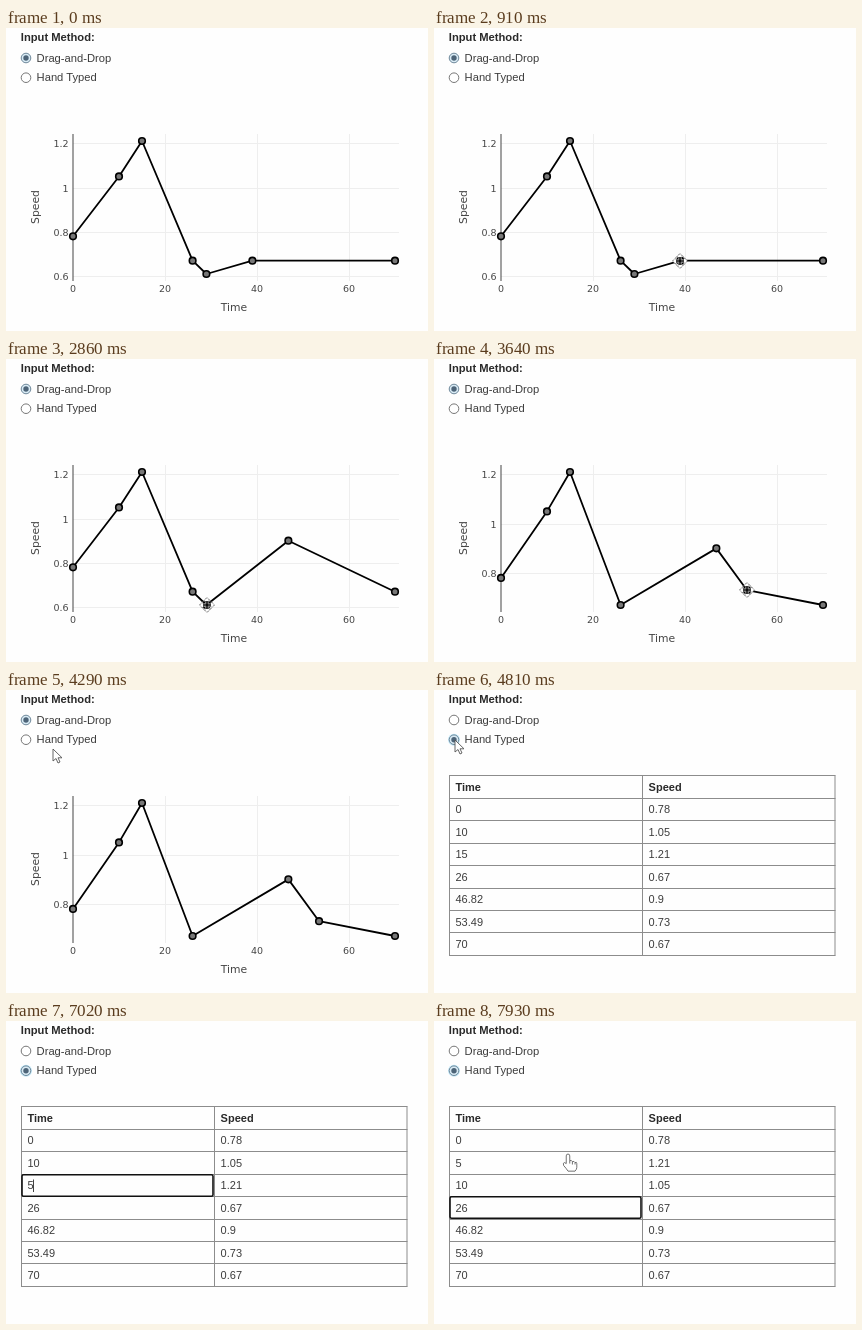
Write an HTML page that moves like this. It is 422 px wide and 303 px high and loops after 8 s.

```html
<!DOCTYPE html>
<html lang="en">
<head>
<meta charset="utf-8">
<title>Input method</title>
<style>
  html, body { margin: 0; width: 100%; height: 100%; overflow: hidden; background: #fefefe; }
  svg { display: block; width: 422px; height: 303px; font: 11.2px "Liberation Sans", Arial, sans-serif; fill: #3c3c3c; }
  .bold { font-weight: bold; fill: #2a2a2a; }
  .cell { font-size: 11px; }
  .tick { font: 9.5px "DejaVu Sans", Verdana, sans-serif; fill: #444; }
  .axis { font: 10.8px "DejaVu Sans", Verdana, sans-serif; fill: #444; text-anchor: middle; }
  .grid { stroke: #eee; }
  .zero { stroke: #444; }
  .trace { fill: none; stroke: #000; stroke-width: 1.8; stroke-linejoin: round; }
  .marker { fill: #777; stroke: #000; stroke-width: 1.6; }
  .border { fill: none; stroke: #8c8c8c; stroke-width: 1; }
  .active { fill: #fefefe; stroke: #111; stroke-width: 1.6; }
  .pointer { fill: #fff; stroke: #555; stroke-width: .9; stroke-linejoin: round; }
</style>
</head>
<body>
<svg id="stage" viewBox="0 0 422 303"></svg>
<script>
const LOOP = 8000, STEP = 130;
const TABLE_OPENS = 4680, RELEASE_A = 1950, RELEASE_B = 3640;
const CELL_CLICK = 6110, TYPED = 7020, ENTERED = 7410, SORTED = 7540;

// Pointer stops: time, x, y, shape used from that time on
const stops = [
  [0, 334, 262, ''],
  [390, 330, 260, 'arrow'],
  [780, 290, 247, 'arrow'],
  [910, 246, 233, 'move'],
  [1170, 247, 232, 'move'],
  [1690, 282, 181, 'move'],
  [1950, 282, 181, 'move'],
  [2080, 258, 200, 'arrow'],
  [2340, 202, 244, 'move'],
  [2730, 202, 244, 'move'],
  [2860, 201, 246, 'move'],
  [3120, 206, 245, 'move'],
  [3510, 313, 231, 'move'],
  [3640, 313, 231, 'move'],
  [3770, 262, 196, 'arrow'],
  [4160, 62, 76, 'arrow'],
  [4290, 47, 59, 'arrow'],
  [4550, 21, 49, 'arrow'],
  [4810, 21, 50, 'arrow'],
  [5070, 46, 94, 'hand'],
  [5590, 76, 178, 'hand'],
  [5720, 74, 177, 'hand'],
  [5980, 58, 164, 'hand'],
  [6240, 58, 164, 'hand'],
  [7020, 58, 164, ''],
  [7930, 134, 134, 'hand']
];

const start = [[0, .78], [10, 1.05], [15, 1.21], [26, .67], [29, .61], [39, .67], [70, .67]];
const raised = start.map((p, i) => i === 5 ? [46.82, .9] : p);
const moved = [...raised.filter((p, i) => i !== 4 && i !== 6), [53.49, .73], [70, .67]];

const line = (x1, y1, x2, y2, cls) =>
  `<line x1="${x1}" y1="${y1}" x2="${x2}" y2="${y2}" class="${cls}"/>`;
const text = (x, y, str, cls = '', extra = '') =>
  `<text x="${x}" y="${y}" class="${cls}" ${extra}>${str}</text>`;

function pointerAt(t) {
  const i = stops.findLastIndex(s => s[0] <= t);
  const [t0, x0, y0, kind] = stops[i];
  const [t1, x1, y1] = stops[i + 1] || [LOOP, x0, y0];
  const k = (t - t0) / (t1 - t0);
  return { x: x0 + (x1 - x0) * k, y: y0 + (y1 - y0) * k, kind };
}

function radio(y, label, checked, focused) {
  const halo = focused ? `<circle cx="20" cy="${y}" r="6" fill="#c3e8f8"/>` : '';
  const dot = checked ? `<circle cx="20" cy="${y}" r="2.7" fill="#4d6478"/>` : '';
  return halo + `<circle cx="20" cy="${y}" r="4.8" fill="${checked ? '#d8eaf4' : '#fff'}"
    stroke="${checked ? '#6d8799' : '#777'}"/>` + dot + text(30.6, y + 3.5, label);
}

function chart(t, pointer) {
  const points = t < RELEASE_A ? start : t < RELEASE_B ? raised : moved;
  const low = Math.min(...points.map(p => p[1]));
  const px = v => 67 + v * 4.6;
  const py = v => 246 - (v - low) / (1.21 - low) * 133;
  const dragged = t >= 1170 && t < RELEASE_A ? 5 : t >= 3120 && t < RELEASE_B ? 4 : -1;
  let out = '';
  for (const v of [.6, .8, 1, 1.2]) {
    if (v < low - .05) continue;
    const y = Math.round(py(v)) + .5;
    out += line(67, y, 393, y, 'grid') + text(62.5, y + 3, v, 'tick', 'text-anchor="end"');
  }
  for (const v of [0, 20, 40, 60]) {
    const x = px(v);
    if (v) out += line(x + .5, 106, x + .5, 253, 'grid');
    out += text(x, 264, v, 'tick', 'text-anchor="middle"');
  }
  out += line(67, 106, 67, 253, 'zero');
  out += text(228, 283, 'Time', 'axis') + text(0, 0, 'Speed', 'axis', 'transform="translate(33 179) rotate(-90)"');
  out += `<polyline class="trace" points="${points.map(p => [px(p[0]), py(p[1])]).join(' ')}"/>`;
  points.forEach((p, i) => {
    const [x, y] = i === dragged ? [pointer.x, pointer.y] : [px(p[0]), py(p[1])];
    out += `<circle class="marker" cx="${x}" cy="${y}" r="3.3"/>`;
  });
  return out;
}

function table(t) {
  const rows = moved.map(p => [...p]);
  if (t >= TYPED) rows[2][0] = 5;
  if (t >= SORTED) rows.sort((a, b) => a[0] - b[0]);
  const active = t < CELL_CLICK ? -1 : t < ENTERED ? 2 : 3;
  const top = i => 85.85 + 22.44 * i;
  const edge = i => Math.floor(top(i)) + .5;
  let out = '';
  for (let i = 0; i <= 8; i++) out += line(15, edge(i), 401.5, edge(i), 'border');
  for (const x of [15.5, 208.5, 401]) out += line(x, edge(0), x, edge(8), 'border');
  if (active >= 0) {
    out += `<rect class="active" x="16" y="${edge(active + 1) + .3}" width="191" height="21.4" rx="1.5"/>`;
  }
  [['Time', 'Speed'], ...rows].forEach((row, i) => {
    const cls = i ? 'cell' : 'cell bold', y = top(i) + 15.2;
    out += text(21.5, y, row[0], cls) + text(214.6, y, row[1], cls);
  });
  if (t >= TYPED && t < ENTERED) out += line(27.5, 158.5, 27.5, 171, 'zero');
  return out;
}

const shapes = {
  arrow: '<path class="pointer" d="M0 0V12L3 9.5L5 14L7 13L5 8.8H9Z"/>',
  hand: `<g transform="scale(.88 .95)">
    <path class="pointer" d="M-2 9V1Q-2-1 0-1T2 1V6Q4 5 5 7Q7 6 8 8Q10 7 10 9V13Q10 15 8 17H0Q-2 14-5 11Q-6 8-4 8Z"/>
    <path class="pointer" d="M2 6V9M5 7V10M8 8V10"/></g>`,
  move: `<path class="pointer" stroke-dasharray="1.4 .7" d="M0-7.5L3.5-4H1.5V-1.5H4V-3.5L7.5 0L4 3.5V1.5H1.5V4H3.5L0 7.5L-3.5 4H-1.5V1.5H-4V3.5L-7.5 0L-4-3.5V-1.5H-1.5V-4H-3.5Z"/>
    <path d="M-4 0H4M0-4V4" stroke="#000" stroke-width="1.6"/>`
};

const stage = document.getElementById('stage');
let shown = -1;

function render(t) {
  const pointer = pointerAt(t), typed = t >= TABLE_OPENS;
  stage.innerHTML = text(14.8, 13.1, 'Input Method:', 'bold') +
    radio(30, 'Drag-and-Drop', !typed) +
    radio(49.7, 'Hand Typed', typed, typed) +
    (typed ? table(t) : chart(t, pointer)) +
    `<g transform="translate(${pointer.x} ${pointer.y})">${shapes[pointer.kind] || ''}</g>`;
}

const began = performance.now();
function tick() {
  const step = Math.floor((performance.now() - began) % LOOP / STEP);
  if (step !== shown) render((shown = step) * STEP);
  requestAnimationFrame(tick);
}
tick();
</script>
</body>
</html>
```
